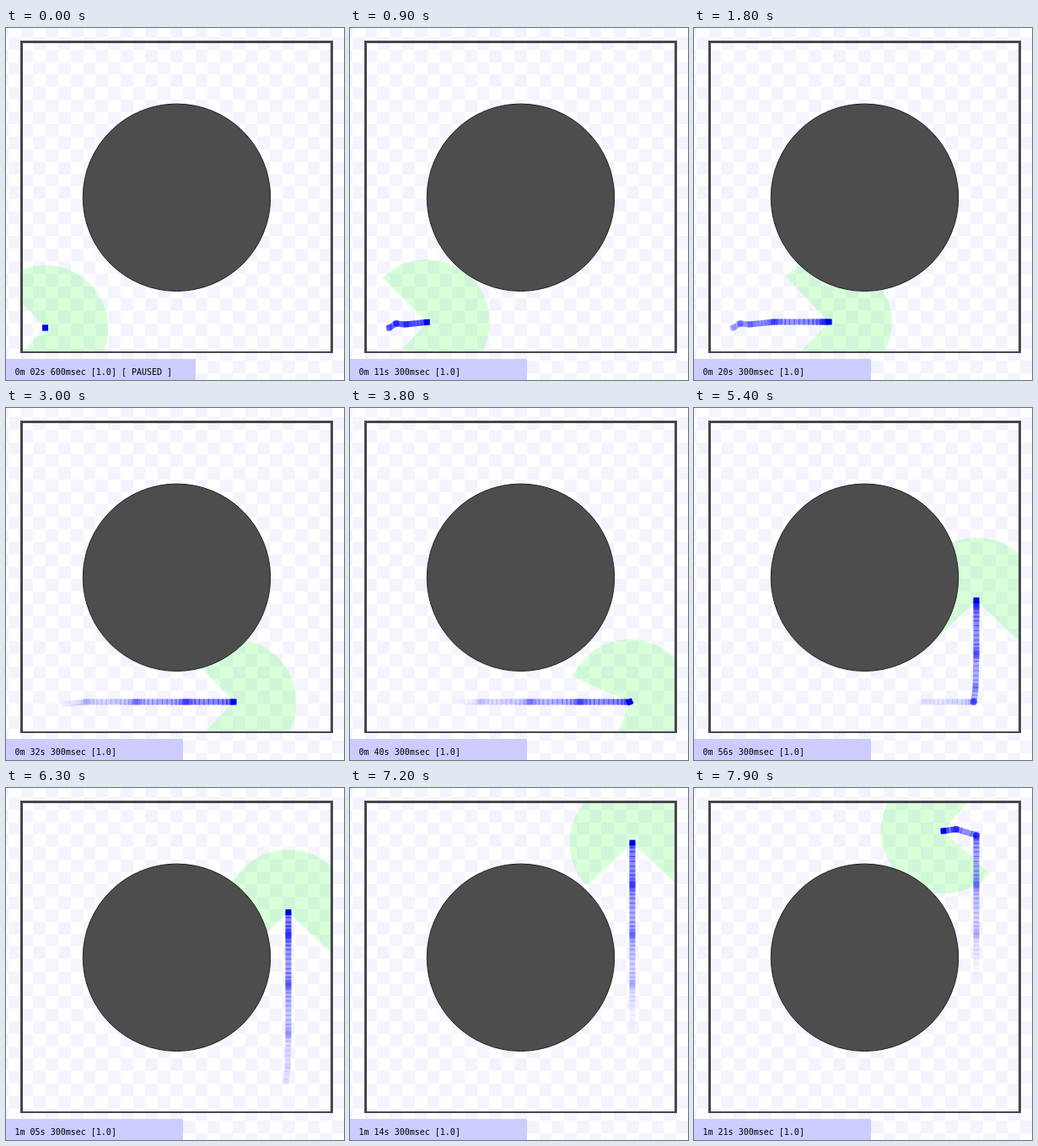
An HTML page with a canvas that plays this animation: 401 px wide and 418 px high, repeating every 8000 ms.

```html
<!DOCTYPE html>
<html lang="en">
<head>
<meta charset="utf-8">
<title>Robot patrol</title>
<style>
html, body { margin: 0; width: 100%; height: 100%; overflow: hidden; background: #fff; }
canvas { display: block; }
</style>
</head>
<body>
<canvas id="stage" width="401" height="418"></canvas>
<script>
const ctx = document.getElementById('stage').getContext('2d');
const RAD = Math.PI / 180;
const TILE = 14.78;
const RANGE = 74.5;
const HALF_VIEW = 133.5 * RAD;

// Stops of the route: simulated seconds, x, y, heading in degrees.
const route = [
  [2.6, 46.5, 356, 0], [3.2, 46.5, 356, -30], [4.4, 54.5, 351, -30], [5.2, 54.5, 351, 6],
  [7.2, 66, 352, -6], [12.3, 95, 349, 0]
];
for (let i = 1; i <= 4; i++) route.push([12.3 + 6.87 * i, 95 + 59.2 * i, 349, 0]);
route.push([41.6, 332, 349, -80], [44, 334, 332, -90]);
for (let i = 0; i <= 4; i++) route.push([48.4 + 6.85 * i, 335, 293 - 59.2 * i, -90]);
route.push([76.5, 335, 56, -155], [79, 311, 49, -165], [79.4, 311, 49, -190], [82.5, 288, 52, -180]);

function poseAt(time) {
  const t = Math.max(time, route[0][0]);
  const next = Math.max(1, route.findIndex(stop => stop[0] > t));
  const a = route[next - 1], b = route[next];
  const u = (t - a[0]) / (b[0] - a[0]);
  const eased = 0.3 * u + 0.7 * u * u * (3 - 2 * u);
  const mix = (i, k) => a[i] + (b[i] - a[i]) * k;
  return { x: mix(1, eased), y: mix(2, eased), angle: mix(3, u) * RAD };
}

function drawFloor() {
  ctx.fillStyle = '#fff';
  ctx.fillRect(0, 0, 401, 418);
  ctx.fillStyle = '#f4f4ff';
  for (let row = 0; row < 30; row++) {
    for (let col = row % 2; col < 30; col += 2) {
      const x = Math.round(2.9 + (col - 1) * TILE);
      const y = Math.round(11 + (row - 1) * TILE);
      ctx.fillRect(x, y, Math.round(2.9 + col * TILE) - x, Math.round(11 + row * TILE) - y);
    }
  }
}

function drawScan({ x, y, angle }) {
  ctx.save();
  ctx.beginPath();
  ctx.rect(19, 17, 367, 368);
  ctx.clip();
  ctx.fillStyle = 'rgba(0,255,0,.15)';
  ctx.beginPath();
  ctx.moveTo(x, y);
  ctx.arc(x, y, RANGE, angle - HALF_VIEW, angle + HALF_VIEW);
  ctx.fill();
  ctx.restore();
}

function drawBody({ x, y, angle }, color) {
  ctx.save();
  ctx.translate(x, y);
  ctx.rotate(angle);
  ctx.fillStyle = color;
  ctx.fillRect(-3.5, -3.5, 7, 7);
  ctx.restore();
}

function drawTrail(time) {
  const latest = Math.floor(time * 2) / 2;
  for (let i = 49; i >= 0; i--) {
    const t = latest - i / 2;
    if (t >= 2.5) drawBody(poseAt(t), `rgba(0,0,255,${(50 - i) / 100})`);
  }
}

function drawWalls() {
  ctx.fillStyle = '#4d4d4d';
  ctx.strokeStyle = '#222';
  ctx.lineWidth = 1;
  ctx.beginPath();
  ctx.arc(202.5, 201.3, 111.2, 0, 2 * Math.PI);
  ctx.fill();
  ctx.stroke();
  ctx.strokeStyle = '#47474b';
  ctx.lineWidth = 3;
  ctx.beginPath();
  ctx.moveTo(18.5, 386);
  ctx.lineTo(18.5, 16.5);
  ctx.lineTo(386.5, 16.5);
  ctx.lineTo(386.5, 386);
  ctx.stroke();
  ctx.fillStyle = '#47474b';
  ctx.fillRect(17, 384, 371, 2);
}

function drawStatus(time, paused) {
  const tenths = Math.round(time * 10);
  const minutes = Math.floor(tenths / 600);
  const seconds = String(Math.floor(tenths / 10) % 60).padStart(2, '0');
  ctx.fillStyle = '#ccccff';
  ctx.fillRect(0, 393, paused ? 225 : 210, 25);
  ctx.fillStyle = '#000';
  ctx.font = '10px "DejaVu Sans Mono", monospace';
  ctx.fillText(`${minutes}m ${seconds}s ${tenths % 10}00msec [1.0]${paused ? ' [ PAUSED ]' : ''}`, 10.5, 411.5);
}

function draw(now) {
  const step = Math.floor((now % 8000) / 100);
  const paused = step === 0;
  const time = paused ? 2.6 : 2.3 + step;
  const pose = poseAt(time);
  drawFloor();
  drawScan(pose);
  drawTrail(time);
  drawWalls();
  drawBody(pose, '#0000e6');
  drawStatus(time, paused);
  requestAnimationFrame(draw);
}
draw(performance.now());
</script>
</body>
</html>
```
